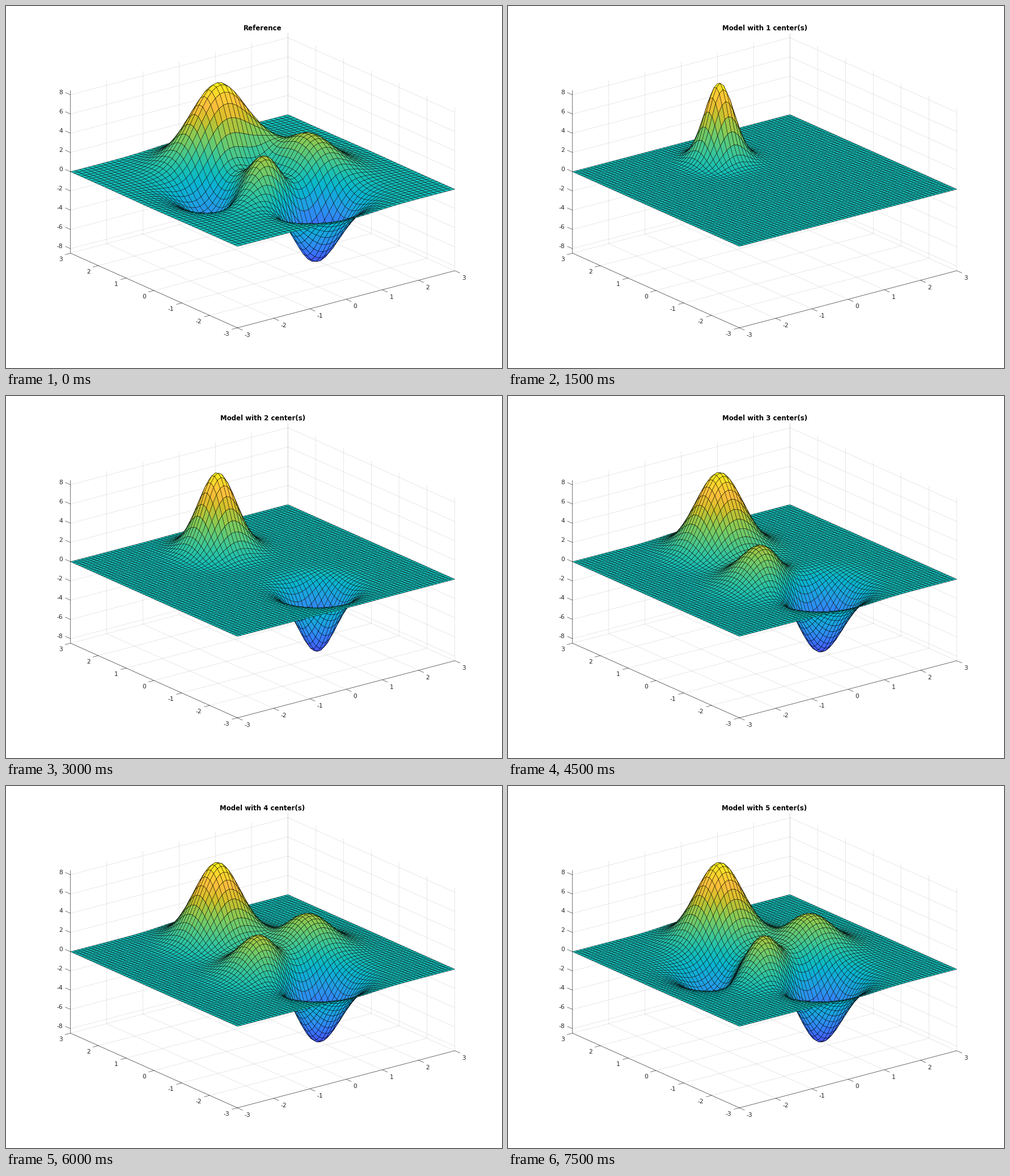
These frames come from a looping animation (875 by 640 pixels, 8 s). A matplotlib script:

```python
import numpy as np
import matplotlib.pyplot as plt
from matplotlib.animation import FuncAnimation
from matplotlib.collections import LineCollection, PolyCollection
from matplotlib.colors import LinearSegmentedColormap, Normalize

W, H, DPI = 875, 640, 100
PX = 72 / DPI
ZLIM = 8.47
INK = "#262626"

CMAP = LinearSegmentedColormap.from_list("bluegold", [
    (0, "#3e26a8"), (.127, "#484df0"), (.238, "#3875fe"), (.333, "#2797eb"),
    (.444, "#08b5d0"), (.5, "#12beb9"), (.556, "#31c69f"), (.667, "#81cc59"),
    (.762, "#d1bf27"), (.841, "#febe3c"), (1, "#f9fb14")])
NORM = Normalize(-ZLIM, ZLIM)


def project(x, y, z):
    """Orthographic view, in stage pixels with y pointing down."""
    u = 452.75 + 63.92 * x - 49.08 * y
    v = 308.5 - 16.83 * x - 22.0 * y - 17.0 * z
    return np.stack(np.broadcast_arrays(u, v), axis=-1)


def peaks(x, y):
    return (3 * (1 - x)**2 * np.exp(-x**2 - (y + 1)**2)
            - 10 * (x / 5 - x**3 - y**5) * np.exp(-x**2 - y**2)
            - np.exp(-(x + 1)**2 - y**2) / 3)


def mesh(n):
    axis = np.linspace(-3, 3, n)
    return np.meshgrid(axis, axis)


def model(x, y, centers):
    """Gaussian interpolation of the surface through the centers."""
    cx, cy = np.transpose(centers)
    decay = max(1.8, 6.4 - 1.8 * len(centers))

    def basis(px, py):
        return np.exp(-decay * ((px[..., None] - cx)**2
                                + (py[..., None] - cy)**2))

    return basis(x, y) @ np.linalg.solve(basis(cx, cy), peaks(cx, cy))


def shade(x, y, z):
    """Quads from far to near with one flat colour each."""
    p = project(x, y, z)
    quads = np.stack([p[:-1, :-1], p[:-1, 1:], p[1:, 1:], p[1:, :-1]], axis=2)
    colors = CMAP(NORM(z[:-1, :-1][::-1, ::-1].ravel()))
    return quads[::-1, ::-1].reshape(-1, 4, 2), colors


def build_stages(count):
    """The sampled surface, then models gaining a center at the worst error."""
    sx, sy = mesh(49)
    fx, fy = mesh(61)
    data = peaks(sx, sy)
    stages = [(*shade(sx, sy, data), "Reference")]
    error, centers = data, []
    for n in range(1, count + 1):
        worst = np.unravel_index(np.abs(error).argmax(), error.shape)
        centers.append((sx[worst], sy[worst]))
        error = data - model(sx, sy, centers)
        stages.append((*shade(fx, fy, model(fx, fy, centers)),
                       f"Model with {n} center(s)"))
    return stages


def segment(a, b):
    return [project(*a), project(*b)]


def add_tick(point, value, tick, dx, dy, ha):
    frame.append([point, point + tick])
    ax.text(point[0] + dx, point[1] + dy + 3.9, str(value), ha=ha,
            va="baseline", fontsize=10.7 * PX, color=INK)


def add_lines(lines, width, **style):
    group = LineCollection(lines, colors=INK, linewidths=width * PX, **style)
    group.set_snap(False)
    ax.add_collection(group)


plt.rcParams["font.family"] = "DejaVu Sans"
fig = plt.figure(figsize=(W / DPI, H / DPI), dpi=DPI, facecolor="white")
ax = fig.add_axes([0, 0, 1, 1])
ax.set_xlim(0, W)
ax.set_ylim(H, 0)
ax.axis("off")

grid = []
frame = [segment((-3, 3, -ZLIM), (-3, 3, ZLIM)),
         segment((-3, 3, -ZLIM), (-3, -3, -ZLIM)),
         segment((-3, -3, -ZLIM), (3, -3, -ZLIM))]
for t in range(-3, 4):
    grid += [segment((t, -3, -ZLIM), (t, 3, -ZLIM)),
             segment((-3, t, -ZLIM), (3, t, -ZLIM)),
             segment((t, 3, -ZLIM), (t, 3, ZLIM)),
             segment((3, t, -ZLIM), (3, t, ZLIM))]
    add_tick(project(t, -3, -ZLIM), t, (9.2, 4.1), 12.7, 12, "left")
    add_tick(project(-3, t, -ZLIM), t, (-9.7, 2.6), -14.2, 10.5, "right")
for t in range(-8, 9, 2):
    grid += [segment((-3, 3, t), (3, 3, t)), segment((3, 3, t), (3, -3, t))]
    add_tick(project(-3, 3, t), t, (-9.2, -4.1), -13.7, -4.5, "right")

add_lines(grid, 0.7, alpha=0.15, zorder=1)
add_lines(frame, 0.6, zorder=2)
surface = PolyCollection([], edgecolors="black", linewidths=0.45 * PX, zorder=3)
ax.add_collection(surface)
title = ax.text(452.6, 43.3, "", ha="center", va="baseline", color="black",
                fontsize=11.7 * PX, fontweight="bold")

STAGES = build_stages(5)


def update(i):
    quads, colors, text = STAGES[i // 3]
    surface.set_verts(quads)
    surface.set_facecolor(colors)
    title.set_text(text)
    return surface, title


anim = FuncAnimation(fig, update, frames=16, interval=500, repeat=True,
                     init_func=lambda: update(0))
plt.show()
```
